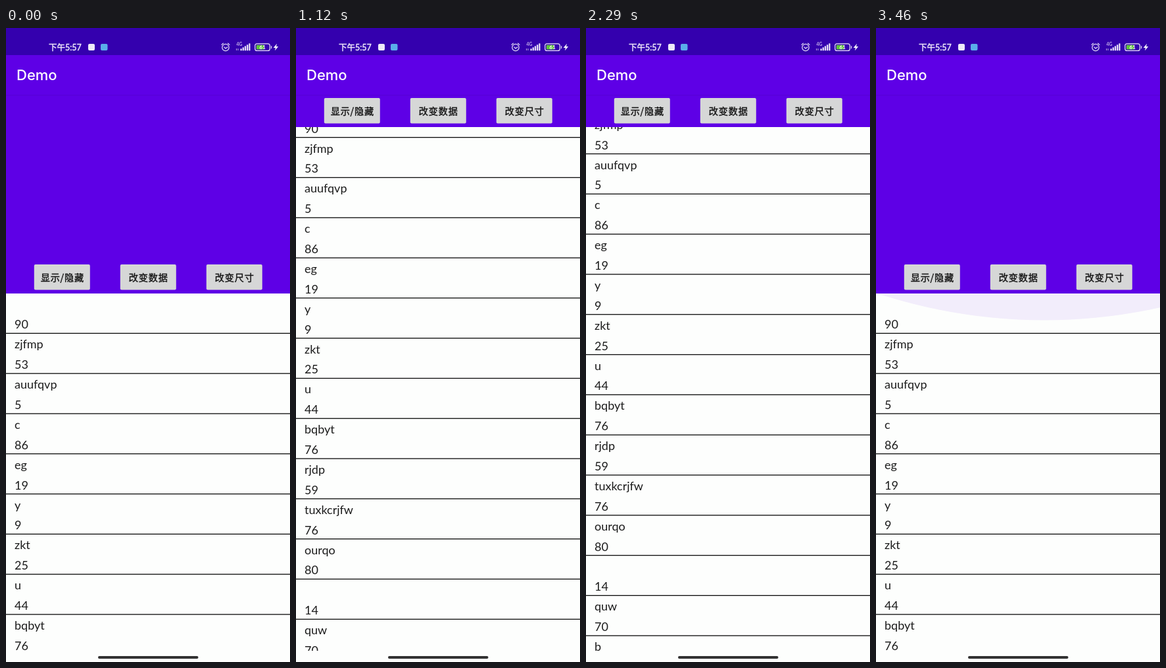
An HTML page for the animation above (3.51 s loop, 432 by 960 pixels).

```html
<!DOCTYPE html>
<html lang="zh">
<head>
<meta charset="utf-8">
<title>Demo</title>
<style>
html, body { margin: 0; width: 100%; height: 100%; overflow: hidden; background: #fdfefd; }
svg { display: block; width: 432px; height: 960px; }
text { white-space: pre; }
.row { font: 18px Lato, sans-serif; fill: #1c1c1c; }
.btn { font: 14.2px "Noto Sans CJK SC", "Noto Sans CJK", sans-serif; letter-spacing: .8px; fill: #151515; stroke: #151515; stroke-width: .4px; text-anchor: middle; }
.bar { font: 12.5px Lato, "Noto Sans CJK SC", "Noto Sans CJK", sans-serif; fill: #f0eafa; stroke: #f0eafa; stroke-width: .45px; }
.title { font: 500 22px Inter, sans-serif; fill: #fff; }
</style>
</head>
<body>
<svg viewBox="0 0 432 960">
  <defs><clipPath id="clip"><rect id="view" width="432"/></clipPath></defs>
  <rect width="432" height="960" fill="#fdfefd"/>
  <g clip-path="url(#clip)">
    <circle id="glow" cx="256" r="817" fill="#f2edfb"/>
    <g id="list"></g>
  </g>
  <rect id="head" y="41" width="432" fill="#5e00e6"/>
  <g id="buttons"></g>
  <rect y="41" width="432" height="60" fill="#5e00e6"/>
  <rect y="101" width="432" height="1.5" fill="#000" opacity=".06"/>
  <rect width="432" height="41" fill="#3400ae"/>
  <text class="title" x="16" y="79">Demo</text>

  <text class="bar" x="65" y="33.5">下午5:57</text>
  <rect x="125" y="24" width="10" height="10" rx="2" fill="#eee9f8"/>
  <rect x="144" y="24" width="10.5" height="10" rx="2" fill="#5aaeea"/>
  <g fill="none" stroke="#e9e2f7" stroke-width="1.2" stroke-linecap="round">
    <circle cx="334" cy="29.5" r="5.2"/>
    <path d="M331.8 28.8L334 31L336.8 29M328 25.4L330.4 23.2M340 25.4L337.6 23.2"/>
    <rect x="378.8" y="23.8" width="22.6" height="10.6" rx="3"/>
    <path d="M403.6 27.5V30.7"/>
  </g>
  <text x="350.5" y="26.6" font-family="Lato, sans-serif" font-size="6.8" fill="#eee8fa">4G</text>
  <path d="M350.6 31V34M353 31V34" stroke="#b9a4e2" stroke-width="1"/>
  <g id="signal" fill="#eee8fa"></g>
  <rect x="380.8" y="25.8" width="11.6" height="6.6" rx="1" fill="#5fc43a"/>
  <text x="390.2" y="32.2" font-family="Lato, sans-serif" font-weight="700" font-size="8" fill="#fff" text-anchor="middle">61</text>
  <path d="M412 23.8L406.8 30H410L409 34.2L414.2 28H411Z" fill="#fff"/>

  <rect x="140" y="951" width="152.5" height="4" rx="2" fill="#333"/>
</svg>
<script>
const LOOP = 3510, STEP = 46.75, PITCH = 60.8;
const TOP = 462, MIN_HEAD = 150, MAX_HEAD = 402, BOTTOM = 943;
const rows = " 90,zjfmp 53,auufqvp 5,c 86,eg 19,y 9,zkt 25,u 44,bqbyt 76,rjdp 59,tuxkcrjfw 76,ourqo 80, 14,quw 70,b 79,pznxqrynx 64,edxajgqbz 31"
  .split(",").map(s => s.split(" "));

// [step, y of the first divider] along the drag
const drag = [[0, 462], [11, 336.6], [24, 165.3], [35, 9.8], [37, 0], [49, 129.4], [60, 230], [62, 258.6], [71.6, 462], [74, 512.6]];

const $ = id => document.getElementById(id);
function add(parent, tag, attrs, text = "") {
  const el = document.createElementNS("http://www.w3.org/2000/svg", tag);
  for (const k in attrs) el.setAttribute(k, attrs[k]);
  el.textContent = text;
  parent.appendChild(el);
}

rows.forEach(([name, num], i) => {
  const y = i * PITCH;
  add($("list"), "text", { class: "row", x: 13, y: y - 37.4 }, name);
  add($("list"), "text", { class: "row", x: 13, y: y - 6.6 }, num);
  add($("list"), "rect", { y: y - .3, width: 432, height: 1.3, fill: "#0c0c0c" });
});
["显示/隐藏", "改变数据", "改变尺寸"].forEach((label, i) => {
  const x = 42.8 + 131 * i;
  add($("buttons"), "rect", { x, y: -44, width: 85, height: 38.4, rx: 2, fill: "#d6d7d7" });
  add($("buttons"), "text", { class: "btn", x: x + 43, y: -19 }, label);
});
for (let i = 0; i < 5; i++) {
  const h = 3 + 2 * i;
  add($("signal"), "rect", { x: 356.5 + 3.2 * i, y: 34.3 - h, width: 2.2, height: h, rx: .6 });
}

const secant = i => (drag[i + 1][1] - drag[i][1]) / (drag[i + 1][0] - drag[i][0]);
function slope(i) {
  if (i === 0) return secant(0);
  if (i === drag.length - 1) return secant(i - 1);
  const a = secant(i - 1), b = secant(i);
  return a * b <= 0 ? 0 : (a + b) / 2;
}
function position(u) {
  let i = 0;
  while (i < drag.length - 2 && u > drag[i + 1][0]) i++;
  const [u0, y0] = drag[i], [u1, y1] = drag[i + 1];
  const d = u1 - u0, s = (u - u0) / d, r = 1 - s;
  return y0 * r * r * (1 + 2 * s) + y1 * s * s * (3 - 2 * s)
    + d * s * r * (r * slope(i) - s * slope(i + 1));
}

function draw(ms) {
  const step = Math.min(74, Math.floor((ms % LOOP + 6) / STEP));
  const pos = position(step);
  const y = Math.min(TOP, pos), pull = Math.max(0, pos - TOP);
  const head = Math.max(MIN_HEAD, Math.min(MAX_HEAD, y - 60));
  $("list").setAttribute("transform", `translate(0 ${y})`);
  $("buttons").setAttribute("transform", `translate(0 ${head})`);
  $("head").setAttribute("height", head - 41);
  $("view").setAttribute("y", head);
  $("view").setAttribute("height", BOTTOM - head);
  $("glow").setAttribute("cy", MAX_HEAD + pull * .8 - 817);
  $("glow").setAttribute("visibility", pull > 0 ? "visible" : "hidden");
}

const start = performance.now();
function tick() {
  draw(performance.now() - start);
  requestAnimationFrame(tick);
}
tick();
</script>
</body>
</html>
```
